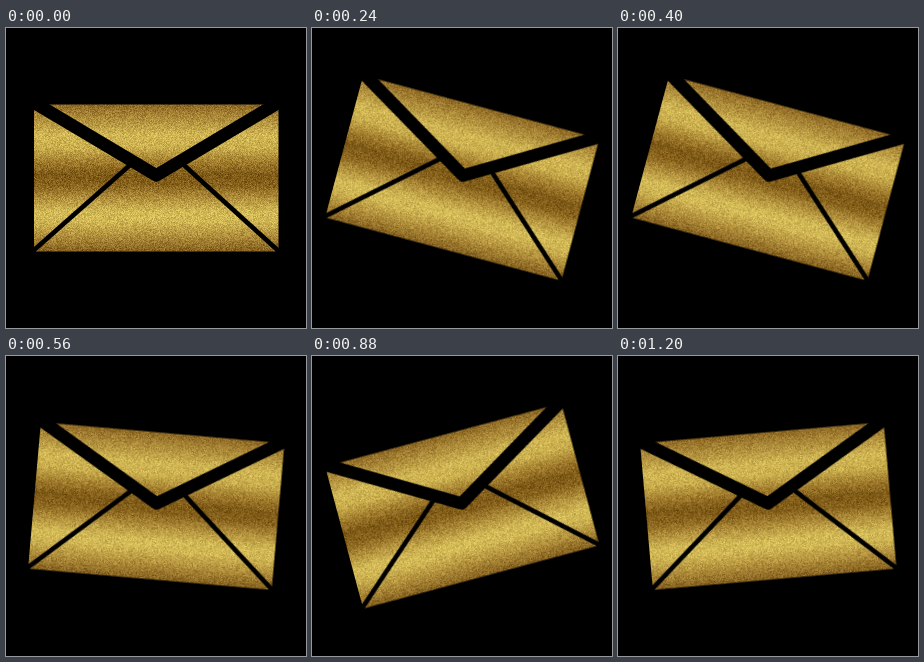
Animation, 300 px wide and 300 px high, one loop 1.28 s. Source, as an HTML page with a canvas:

```html
<!DOCTYPE html>
<html lang="en">
<head>
<meta charset="utf-8">
<title>Swinging gold envelope</title>
<style>
  html, body { margin: 0; width: 100%; height: 100%; overflow: hidden; background: #000; }
  canvas { display: block; width: 100vw; height: 100vh; animation: swing 1280ms infinite; }
  /* 5 degrees every 80 ms */
  @keyframes swing {
    0%   { transform: rotate(0deg);   animation-timing-function: steps(4, end); }
    25%  { transform: rotate(20deg);  animation-timing-function: steps(8, end); }
    75%  { transform: rotate(-20deg); animation-timing-function: steps(4, end); }
    100% { transform: rotate(0deg); }
  }
</style>
</head>
<body>
<canvas id="envelope" width="300" height="300"></canvas>
<script>
  const ctx = document.getElementById('envelope').getContext('2d');
  const left = 28, right = 272.5, upper = 76.5, lower = 223.5;

  let seed = 12345;
  function random() {
    seed = (Math.imul(seed, 1664525) + 1013904223) >>> 0;
    return seed / 4294967296;
  }

  function fillGold() {
    const gold = ctx.createLinearGradient(0, upper, 0, lower);
    const stops = [
      [0, '#8c6723'], [0.1, '#ae8d3b'], [0.21, '#d0b654'], [0.3, '#c9ad4d'],
      [0.4, '#9c772a'], [0.48, '#7d5917'], [0.55, '#86611c'], [0.64, '#b1903c'],
      [0.73, '#d2b956'], [0.8, '#d0b654'], [0.9, '#ad8b39'], [1, '#84601f']
    ];
    for (const [at, colour] of stops) gold.addColorStop(at, colour);
    ctx.fillStyle = gold;
    ctx.fillRect(0, 0, 300, 300);
  }

  function addGrain(strength) {
    const image = ctx.getImageData(0, 0, 300, 300);
    const d = image.data;
    for (let i = 0; i < d.length; i += 4) {
      const n = (random() + random() - 1) * strength;
      d[i] += n;
      d[i + 1] += n;
      d[i + 2] += n * 0.7;
    }
    ctx.putImageData(image, 0, 0);
  }

  function cut(width, points) {
    ctx.lineWidth = width;
    ctx.beginPath();
    for (const [x, y] of points) ctx.lineTo(x, y);
    ctx.stroke();
  }

  fillGold();
  addGrain(36);

  ctx.globalCompositeOperation = 'destination-in';
  ctx.fillRect(left, upper, right - left, lower - upper);

  ctx.globalCompositeOperation = 'destination-out';
  ctx.lineJoin = 'round';
  cut(4.6, [[25.2, 224.5], [125.2, 136]]);
  cut(4.6, [[274.2, 224.5], [176.7, 136]]);
  cut(12.6, [[10.3, 64], [150.3, 147.3], [290.3, 64]]);
</script>
</body>
</html>
```
